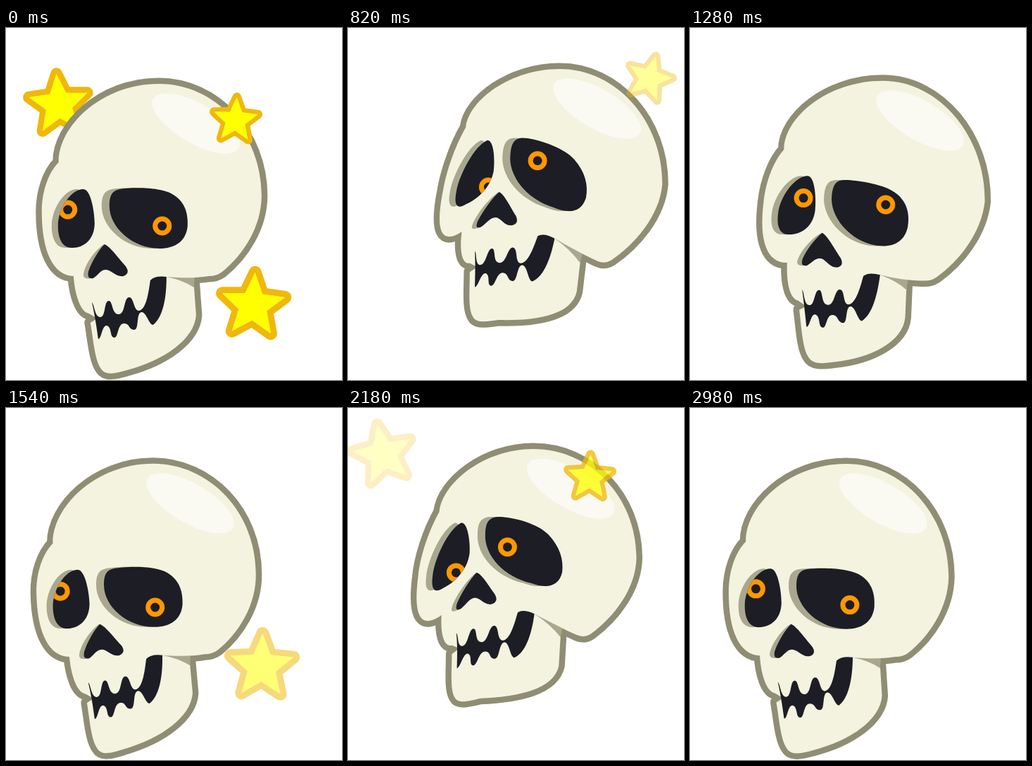
These frames come from a looping animation (477x498 px, 3000 ms). An HTML page with a canvas:

```html
<!DOCTYPE html>
<html>
<head>
<meta charset="utf-8">
<title>Skull and stars</title>
<style>
html, body { margin: 0; width: 100%; height: 100%; overflow: hidden; background: #fff; }
canvas { display: block; }
</style>
</head>
<body>
<canvas id="stage" width="477" height="498"></canvas>
<script>
const ctx = document.getElementById('stage').getContext('2d');
const LOOP = 3000, NOD = 1500;
const OUTLINE = '#8f8e74', BONE = '#f4f3e0', SHADE = '#a9a88f', DARK = '#1d1d25',
      ORANGE = '#ff9800', GOLD = '#efb80a', YELLOW = '#ffff00';

// The skull at the start of a nod, in absolute "x y" pairs.
const head = 'M75 190C74 140 135 79 217 79C298 79 363 150 363 237C363 282 336 322 307 345' +
  'Q299 351 288 351C270 354 250 354 228 352L142 418L118 404C106 402 98 378 96 351' +
  'C68 350 51 318 51 260C51 232 60 205 75 190Z';
const jaw = 'M120 417C124 440 126 470 135 482C141 492 155 489 172 484C225 470 268 440 270 406' +
  'L266 352L228 352L142 403Z';
const jawShade = 'M228 352L268 350L267 367Q252 357 228 352Z';
const eyeR = 'M147 252C147 238 150 230 162 228C180 225 222 225 238 236C254 246 259 262 258 280' +
  'C256 302 240 312 218 312C180 312 147 282 147 252Z';
const eyeL = 'M110 228C121 228 126 262 126 276C126 298 112 311 94 311C80 311 74 298 74 280' +
  'C74 256 92 228 110 228Z';
const noseShade = 'M139 306C122 318 110 340 110 350Q111 356 121 354L142 320Z';
const nose = 'M140 306C148 309 160 326 170 337Q177 347 167 351C156 353 150 342 142 342' +
  'C134 342 131 350 124 354Q115 356 117 345C122 330 132 314 140 306Z';
const mouth = 'M122 388C126 392 126 409 134 409C142 409 139 386 146 386C152 386 150 405 160 405' +
  'C170 405 167 381 175 381C182 381 181 400 189 400C200 398 203 370 205 357Q212 350 228 352' +
  'C228 385 222 410 209 420C203 420 200 403 193 402C184 402 190 427 182 427' +
  'C174 427 176 418 168 418C158 418 160 438 154 438C147 438 151 423 143 421' +
  'C136 421 136 440 131 440C129 425 126 405 122 388Z';

const clamp = (v, lo, hi) => Math.min(hi, Math.max(lo, v));

// Moves a point as the head circles: the face bulges, so its middle travels
// furthest up and down, and its sides tilt against each other.
function turner(phase) {
  const c = Math.cos(2 * Math.PI * phase), s = Math.sin(2 * Math.PI * phase);
  const shiftX = 33 - 33 * c - 59 * s + 6.4 * s * c, shiftY = 10.7 * (c - 1);
  const turn = (x, y) => {
    const face = clamp((y - 79) / 100, 0, 1);
    const bulge = Math.max(0, 1 - ((x - 145) / (x < 145 ? 97 : 150)) ** 2);
    const nod = 27 * face * bulge, tilt = -16 * face * Math.tanh((x - 150) / 90);
    const lean = .085 * (y - 269) * (y < 269 ? Math.max(0, 1 - x / 217) : 1);
    const swing = clamp(.12 * (y - 225), 0, 21);
    return [x + shiftX + lean * (c - 1) + swing * s, y + shiftY + nod * (c - 1) + tilt * s];
  };
  const path = d => new Path2D(d.replace(/(\d+) (\d+)/g, (_, x, y) => turn(+x, +y).join(' ') + ' '));
  return { c, s, shiftX, shiftY, turn, path };
}

function fill(path, color, dx = 0) {
  ctx.save();
  ctx.translate(dx, 0);
  ctx.fillStyle = color;
  ctx.fill(path);
  ctx.restore();
}

function eye(path, [x, y], dx, dy, shadeX) {
  fill(path, SHADE, shadeX);
  fill(path, DARK);
  ctx.save();
  ctx.clip(path);
  ctx.strokeStyle = ORANGE;
  ctx.lineWidth = 7;
  ctx.beginPath();
  ctx.arc(x + dx, y + dy, 10, 0, 7);
  ctx.stroke();
  ctx.restore();
}

function skull(phase) {
  const { c, s, shiftX, shiftY, turn, path } = turner(phase);
  const top = path(head), bottom = path(jaw);
  ctx.lineJoin = 'round';
  ctx.strokeStyle = OUTLINE;
  ctx.lineWidth = 17;
  ctx.stroke(top);
  ctx.stroke(bottom);
  fill(bottom, BONE);
  fill(path(jawShade), SHADE);
  fill(top, BONE);

  const shine = new Path2D();
  shine.ellipse(270 + shiftX, 135 + shiftY, 70, 28, Math.PI / 6, 0, 7);
  fill(shine, '#fafaf3');
  eye(path(eyeL), turn(100, 269), -12 * c - 20 * s, 5.6 - 17.6 * c + 5.6 * s, -9);
  eye(path(eyeR), turn(202, 269), 20 * c - 14 * s, 11 * c + 24 * s, -11);
  fill(path(noseShade), SHADE);
  fill(path(nose), DARK);
  fill(path(mouth), DARK);
}

// Speeds are per second; each flight is [from, to, x, y].
const stars = [
  { behind: true, vx: -40, vy: -78, spin: -22, size: .93, flights: [[-200, 410, 83, 124], [1640, 2220, 72, 108]] },
  { vx: 124, vy: -72, spin: 16, size: .7, flights: [[-200, 890, 301, 145], [2050, 2940, 327, 108]] },
  { vx: 88, vy: 33, spin: 18, size: 1, flights: [[-200, 560, 333, 386], [1450, 2160, 355, 363]] }
];

const starPath = new Path2D();
for (let i = 0; i < 10; i++) {
  const r = i % 2 ? 21 : 47, a = i * Math.PI / 5;
  starPath.lineTo(r * Math.sin(a), -r * Math.cos(a));
}
starPath.closePath();
const outside = new Path2D('M-99-99H99V99H-99Z');
outside.addPath(starPath);

function drawStars(t, behind) {
  for (const star of stars) {
    if (!!star.behind !== behind) continue;
    for (const [from, to, x, y] of star.flights) {
      const alpha = Math.min(1, (t - from) / 170, (to - t) / 170), dt = (t - from) / 1000;
      if (alpha <= 0) continue;
      ctx.save();
      ctx.globalAlpha = alpha;
      ctx.translate(x + star.vx * dt, y + star.vy * dt);
      ctx.rotate(star.spin * dt * Math.PI / 180);
      ctx.scale(star.size, star.size);
      fill(starPath, YELLOW);
      // Only the outer half of the border, so faded layers never overlap.
      ctx.clip(outside, 'evenodd');
      ctx.lineJoin = 'round';
      ctx.lineWidth = 18;
      ctx.strokeStyle = GOLD;
      ctx.stroke(starPath);
      ctx.restore();
    }
  }
}

const start = performance.now();
function draw() {
  const t = (performance.now() - start) % LOOP;
  ctx.fillStyle = '#fff';
  ctx.fillRect(0, 0, 477, 498);
  drawStars(t, true);
  skull(t % NOD / NOD);
  drawStars(t, false);
  requestAnimationFrame(draw);
}
draw();
</script>
</body>
</html>
```
